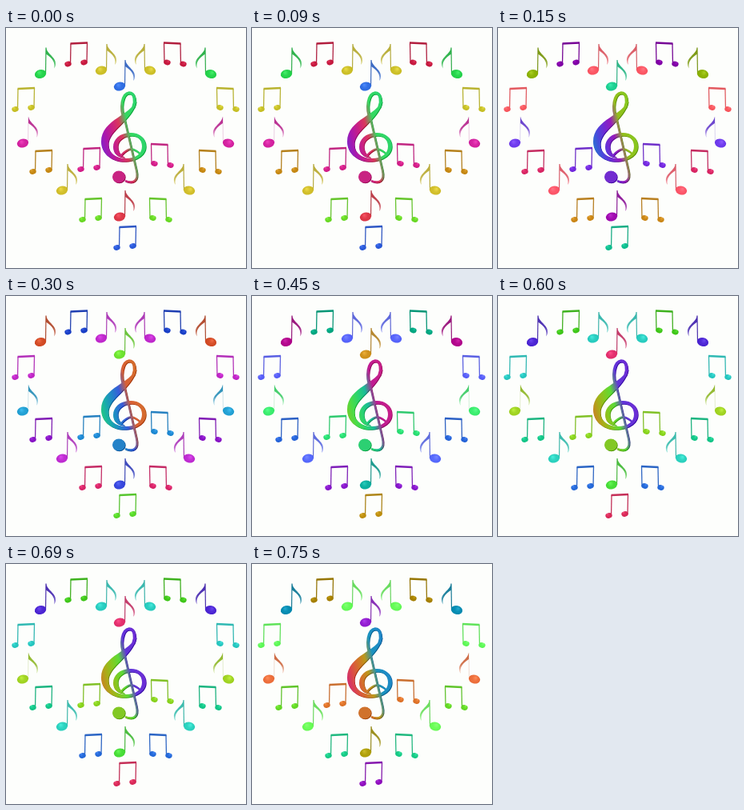
Animation of 300x300 px, one loop 0.9 s. Source, as an HTML page with a canvas:

```html
<!DOCTYPE html>
<html lang="en">
<head>
<meta charset="utf-8">
<title>Heart of notes</title>
<style>
  html, body { margin: 0; width: 100%; height: 100%; overflow: hidden; background: #fdfefc; }
  canvas { display: block; width: 300px; height: 300px; }
</style>
</head>
<body>
<canvas id="stage" width="300" height="300"></canvas>
<script>
const ctx = document.getElementById('stage').getContext('2d');
const STEP_MS = 150, STEPS = 6, AXIS = 299;

// Anchor is the top of the (left) stem; notes with mirror repeat on the right.
const notes = [
  { draw: single, x: 50, y: 24.5, hue: 132, level: 110, mirror: true },
  { draw: pair, x: 81, y: 18.5, hue: 348, level: 98, mirror: true },
  { draw: single, x: 126, y: 20, hue: 56, level: 148, mirror: true },
  { draw: single, x: 149, y: 40, hue: 220, level: 130 },
  { draw: pair, x: 15, y: 75, hue: 58, level: 145, mirror: true },
  { draw: single, x: 28, y: 111, hue: 316, level: 138, mirror: true, faint: true },
  { draw: pair, x: 37, y: 153, hue: 40, level: 120, mirror: true },
  { draw: pair, x: 97, y: 150, hue: 324, level: 128, mirror: true, rise: 5 },
  { draw: single, x: 77, y: 170, hue: 54, level: 150, mirror: true },
  { draw: pair, x: 99, y: 213, hue: 98, level: 122, mirror: true },
  { draw: single, x: 149, y: 203, hue: 355, level: 118 },
  { draw: pair, x: 142, y: 248, hue: 225, level: 118 }
];

const clefBody = new Path2D(
  'M161 91C159 108 119 114 119 142C119 159 135 168 150 167' +
  'C165 166 175 158 175 148C175 137 166 131 156 131C142 131 134 139 134 149' +
  'C134 157 140 162 149 162C143 159 140 154 140 148C140 141 147 135 157 135' +
  'C166 135 170 141 170 148C170 157 162 163 150 163C137 163 128 156 128 146' +
  'C127 128 158 116 163 92Z');
const clefLines = [
  [new Path2D('M148 114C142 100 145 82 154 81C161 81 162 92 159 99'), 3.6],
  [new Path2D('M147 109L163 178C166 191 159 195 149 191'), 2.4],
  [new Path2D('M144 159Q150 152 156 151Q163 152 168 158'), 2.2]
];
const clefBall = new Path2D('M133 186a8 7.5 0 1 0 16 0a8 7.5 0 1 0 -16 0');

// Hue turns around the gray axis, so the mean of the channels stays at level.
function color(hue, level, chroma = 105, alpha = 1) {
  const channels = [0, 120, 240].map(offset =>
    Math.round(level + chroma * Math.cos((hue - offset) * Math.PI / 180)));
  return `rgba(${channels}, ${alpha})`;
}

function line(width, ...points) {
  ctx.lineWidth = width;
  ctx.beginPath();
  points.forEach(([x, y]) => ctx.lineTo(x, y));
  ctx.stroke();
}

function head(x, y, rx, ry, hue, level) {
  const shine = ctx.createRadialGradient(x - 2, y - 2, 0, x, y, rx);
  shine.addColorStop(0, color(hue, level + 28));
  shine.addColorStop(0.5, color(hue, level));
  shine.addColorStop(1, color(hue, level - 8));
  ctx.fillStyle = shine;
  ctx.beginPath();
  ctx.ellipse(x, y, rx, ry, -0.25, 0, Math.PI * 2);
  ctx.fill();
}

function single(hue, level, faint) {
  const fade = ctx.createLinearGradient(0, 0, 12, 26);
  fade.addColorStop(0, color(hue, level - 15, 85));
  fade.addColorStop(0.6, color(hue, level, 75));
  fade.addColorStop(1, color(hue, level + 25, 70, faint ? 0.3 : 0.8));
  ctx.fillStyle = fade;
  ctx.fill(new Path2D('M0 0C2 9 13 12 12 21Q12 24 10 26C12 19 8 13 0 8Z'));
  ctx.strokeStyle = color(hue, level - 10, 75, faint ? 0.2 : 1);
  line(1.2, [0, 0], [-0.5, 33]);
  head(-7, 33, 7.2, 5.4, hue, level);
}

function pair(hue, level) {
  ctx.strokeStyle = color(hue, level - 5, 85);
  line(1.3, [0, 1], [-0.5, 27]);
  line(1.3, [20.5, 0], [20, 25]);
  ctx.strokeStyle = color(hue, level - 8, 90);
  line(2.6, [-0.5, 1], [21, 0]);
  head(-3.5, 26.5, 4.2, 3.3, hue, level);
  head(16.5, 24.5, 4.2, 3.3, hue, level);
}

function drawNote({ draw, x, y, hue, level, mirror, faint, rise = 0 }, turn) {
  for (const side of mirror ? [1, -1] : [1]) {
    ctx.save();
    if (side < 0) ctx.transform(-1, 0, 0, 1, AXIS, -rise);
    ctx.translate(x, y);
    draw(hue + turn, level, faint);
    ctx.restore();
  }
}

function clefGradient(turn, level) {
  const gradient = ctx.createLinearGradient(118, 154, 173, 140);
  [[0, 268], [0.2, 300], [0.38, 325], [0.55, 348], [0.74, 135], [1, 142]]
    .forEach(([at, hue]) => gradient.addColorStop(at, color(hue + turn, level, 98)));
  return gradient;
}

function drawClef(turn) {
  for (const [shift, level] of [[0.7, 65], [0, 122]]) {
    ctx.save();
    ctx.translate(shift, shift);
    ctx.fillStyle = ctx.strokeStyle = clefGradient(turn, level);
    ctx.fill(clefBody);
    for (const [path, width] of clefLines) {
      ctx.lineWidth = width;
      ctx.stroke(path);
    }
    ctx.fillStyle = color(325 + turn, level, 95);
    ctx.fill(clefBall);
    ctx.restore();
  }
}

function render(now) {
  const turn = -60 * (Math.floor(now / STEP_MS) % STEPS);
  ctx.fillStyle = '#fdfefc';
  ctx.fillRect(0, 0, 300, 300);
  notes.forEach(note => drawNote(note, turn));
  drawClef(turn);
  requestAnimationFrame(() => render(performance.now() - start));
}

const start = performance.now();
render(0);
</script>
</body>
</html>
```
